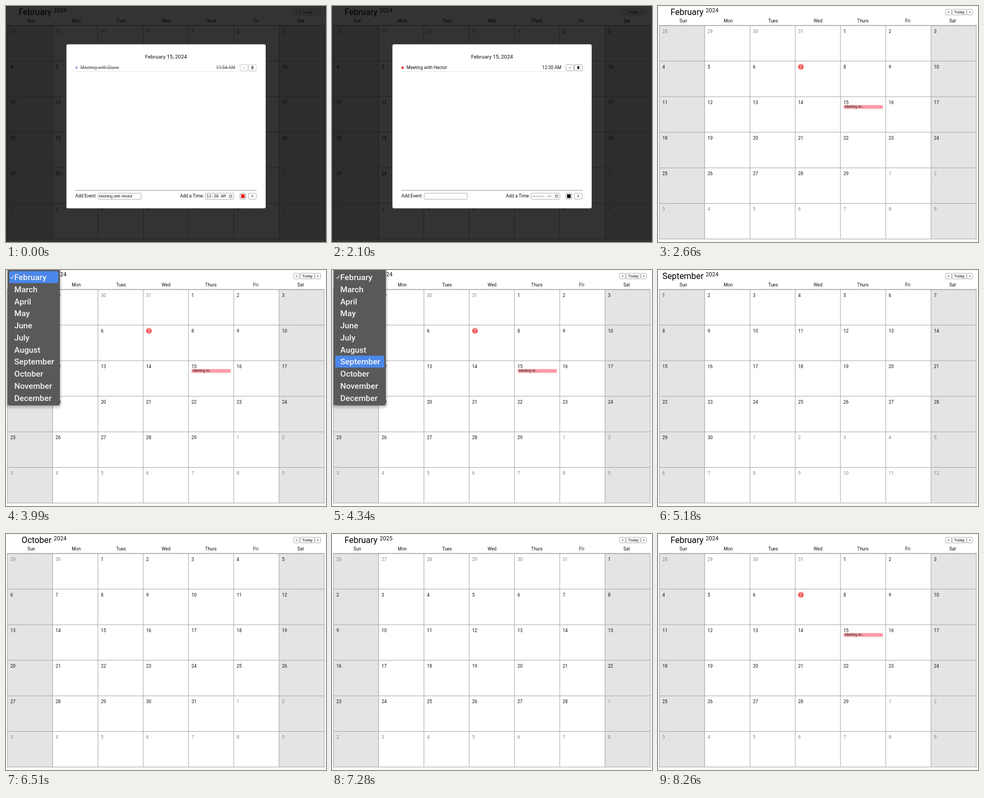
An HTML page that plays this animation: 600 by 445 pixels, repeating every 9800 ms.

```html
<!DOCTYPE html>
<html lang="en">
<head>
<meta charset="utf-8">
<title>Calendar</title>
<style>
html, body { margin: 0; width: 100%; height: 100%; overflow: hidden; background: #fff; }
svg { display: block; width: 600px; height: 445px; font-family: Roboto, sans-serif; }
</style>
</head>
<body>
<svg id="stage" viewBox="0 0 600 445"></svg>
<script>
const LOOP = 9800;
const MONTHS = ['January', 'February', 'March', 'April', 'May', 'June', 'July',
  'August', 'September', 'October', 'November', 'December'];
const DAYS = ['Sun', 'Mon', 'Tues', 'Wed', 'Thurs', 'Fri', 'Sat'];
const BODY = 8.48; // main text size
const COL = 84.88, ROW = 67.1;

// [start time, value]; months count from January 2024
const SHOWN_MONTH = [[0, 1], [5180, 8], [6510, 9], [6720, 10], [6860, 11], [7070, 12],
  [7280, 13], [7490, 14], [7630, 15], [7840, 16], [8260, 1]];
const MENU_ROW = [[0, 0], [4060, 1], [4130, 3], [4200, 5], [4270, 6], [4340, 7], [4760, -1], [4830, 7]];
const MENU_ALPHA = [[0, 0], [3990, 1], [4900, 0.5], [4970, 0.16], [5040, 0.05], [5110, 0]];

const at = (track, t) => track.filter(([start]) => start <= t).pop()[1];

const text = (x, y, str, size = BODY, fill = '#111', extra = '') =>
  `<text x="${x}" y="${y}" font-size="${size}" fill="${fill}" ${extra}>${str}</text>`;
const rect = (x, y, w, h, fill, extra = '') =>
  `<rect x="${x}" y="${y}" width="${w}" height="${h}" fill="${fill}" ${extra}/>`;
const line = (x1, y1, x2, y2, color, extra = '') =>
  `<path d="M${x1} ${y1}L${x2} ${y2}" stroke="${color}" ${extra}/>`;
const circle = (x, y, r, fill, extra = '') =>
  `<circle cx="${x}" cy="${y}" r="${r}" fill="${fill}" ${extra}/>`;
const box = (x, y, w, h, fill = '#fff') =>
  rect(x, y, w, h, fill, 'rx="1.4" stroke="#8a8a8a" stroke-width=".7"');
const MID = 'text-anchor="middle"', END = 'text-anchor="end"';

const colX = c => 2.6 + COL * c;
const rowY = r => 36.8 + ROW * r;

function calendar(month) {
  const first = new Date(2024, month, 1);
  let s = rect(0, 0, 600, 445, '#fff');
  s += text(85.3, 17.4, MONTHS[first.getMonth()], 15.9, '#000', END);
  s += text(89.6, 11.9, first.getFullYear(), 10.6);
  s += box(539.4, 6.2, 10.8, 10.6) + text(544.8, 13.9, '&lt;', 7, '#111', MID);
  s += box(551.6, 6.2, 26.2, 10.6) + text(564.8, 14, 'Today', 7.3, '#111', MID);
  s += box(579.2, 6.2, 10.6, 10.6) + text(584.5, 13.9, '&gt;', 7, '#111', MID);
  DAYS.forEach((day, i) => s += text(300 + (i - 3) * 84.15, 31.2, day, BODY, '#111', MID));

  for (const c of [0, 6])
    s += rect(colX(c), rowY(0), COL, ROW * 6, '#e4e4e4');
  for (let c = 0; c < 8; c++) s += line(colX(c), rowY(0), colX(c), rowY(6), '#a6a6a6');
  for (let r = 0; r < 7; r++) s += line(2, rowY(r), 597.4, rowY(r), r ? '#a6a6a6' : '#777');

  for (let i = 0; i < 42; i++) {
    const date = new Date(2024, month, 1 - first.getDay() + i);
    const x = 8.2 + COL * (i % 7), y = 50.5 + ROW * Math.floor(i / 7);
    const inMonth = date.getMonth() === first.getMonth();
    if (month === 1 && inMonth && date.getDate() === 7) {
      s += circle(268, 114.6, 5.3, '#f25c5c') + text(268, y, 7, BODY, '#fff', MID);
    } else {
      s += text(x, y, date.getDate(), BODY, inMonth ? '#111' : '#858585');
    }
  }
  if (month === 1) {
    s += rect(348, 186.7, 73.5, 7, '#ff9da7', 'rx="1"') + text(350.4, 192.4, 'Meeting wi...', 6.36, '#222');
    s += line(348, 195.5, 421.5, 195.5, '#e6e6e6', 'stroke-width=".7"');
  }
  return s;
}

function eventRow(y, name, time, color, done) {
  const strike = done ? 'text-decoration="line-through"' : '';
  return `<g transform="translate(0 ${y})">` +
    `<g opacity="${done ? 0.65 : 1}">` +
    circle(132.4, 0, 2.2, color) +
    text(139.8, 3.1, name, BODY, '#111', strike) +
    text(430, 3.1, time, BODY, '#111', `${END} ${strike}`) +
    box(438.8, -5.6, 14.6, 11.2) + box(454.6, -5.6, 14.6, 11.2) +
    '<path d="M443.7 .2L445.4 2L448.7 -2.2" fill="none" stroke="#444" stroke-width=".7"/>' +
    '<path d="M459.6 -2.6h4.6v1h-4.6zM460 -1.2h3.8l-.4 4h-3zM461.1 -3.1h1.6v.6h-1.6z" fill="#111"/>' +
    '</g>' + line(130, 7.4, 470, 7.4, '#ddd', 'stroke-width=".8"') + '</g>';
}

function modal(t) {
  const added = t >= 70, removed = t >= 2100;
  const mono = 'font-family="DejaVu Sans Mono, monospace" xml:space="preserve"';
  let s = rect(0, 0, 600, 445, '#000', 'opacity=".8"');
  s += rect(113.3, 72.2, 373.6, 309.4, '#fff', 'rx="3"');
  s += text(300, 98.6, 'February 15, 2024', 9.9, '#111', MID);
  if (!removed) s += eventRow(116.2, 'Meeting with Diane', '11:54 AM', '#6478e6', true);
  if (added) s += eventRow(removed ? 116.2 : 134.9, 'Meeting with Hector', '12:30 AM', '#e01b1b', false);

  s += line(130, 347.6, 470, 347.6, '#8a8a8a', 'stroke-width=".9"');
  s += text(129.9, 361.4, 'Add Event:') + box(173, 353, 80.7, 11.4);
  if (!added) s += text(174.8, 361.1, 'Meeting with Hector', 7.07, '#111', 'font-family="Liberation Sans, Arial, sans-serif"');
  s += text(326.3, 361.4, 'Add a Time:') + box(373.8, 353, 53.4, 11.4);
  s += text(375.9, 361.2, added ? '––:–– ––' : '12:30 AM', 7.5, '#111', mono);
  s += circle(421, 358.7, 2.7, 'none', 'stroke="#222" stroke-width=".7"');
  s += '<path d="M421 357v1.8l1.2 .7" fill="none" stroke="#222" stroke-width=".6"/>';
  s += box(438.7, 353.2, 11, 11, '#efefef') + rect(440.9, 355.2, 6.6, 6.8, added ? '#000' : '#e81010');
  s += box(454.6, 353.2, 14.6, 11) + text(461.9, 361.2, '+', 7.5, '#111', MID);
  return s;
}

function menu(active, alpha) {
  let s = `<g opacity="${alpha}">`;
  // soft shadow from stacked outlines
  for (let i = 1; i < 5; i++)
    s += rect(3 - i, -8, 98 + 2 * i, 264 + 1.6 * i, '#000', `rx="${4 + i}" opacity=".05"`);
  s += rect(3, -8, 98, 263.6, '#595959', 'rx="4"');
  MONTHS.slice(1).forEach((name, i) => {
    const y = 13.6 + 22.76 * i;
    if (i === active) s += rect(6, y - 11.4, 92, 22.6, '#4b87ea', 'rx="3"');
    s += text(15.6, y + 5.4, name, 15.3, '#f4f4f4', 'font-weight="500"');
  });
  return s + '<path d="M8.8 13.9L10.6 16.1L14 10.9" fill="none" stroke="#f4f4f4" stroke-width="1.2"/></g>';
}

function scene(t) {
  const alpha = at(MENU_ALPHA, t);
  return calendar(at(SHOWN_MONTH, t)) +
    (t < 2660 ? modal(t) : '') +
    (alpha ? menu(at(MENU_ROW, t), alpha) : '');
}

const stage = document.getElementById('stage');
let start, last;
function tick(now) {
  start ??= now;
  const markup = scene((now - start) % LOOP);
  if (markup !== last) stage.innerHTML = last = markup;
  requestAnimationFrame(tick);
}
requestAnimationFrame(tick);
</script>
</body>
</html>
```
